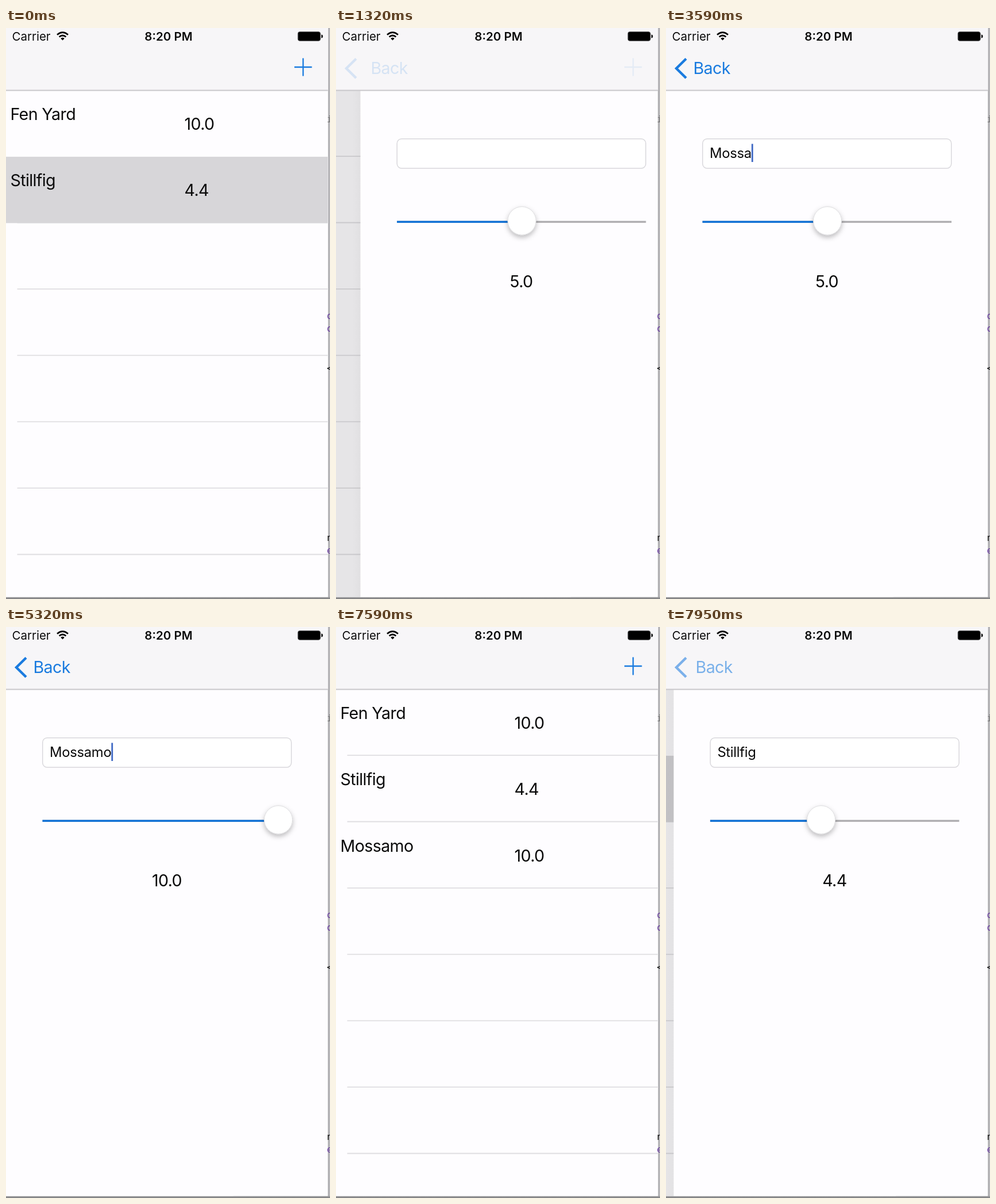
Recreate the animation shown at these times as an HTML page. Size 564 by 993 pixels, loop 8 s.

```html
<!DOCTYPE html>
<html lang="en">
<head>
<meta charset="utf-8">
<title>Rating list</title>
<style>
  html, body { margin: 0; width: 100%; height: 100%; overflow: hidden; background: #fefdff; }
  svg { display: block; width: 100vw; height: 100vh; }
  text { font-family: Inter, Roboto, sans-serif; fill: #0a0a0a; white-space: pre; }
  .body { font-size: 28.6px; letter-spacing: -.022em; }
  .field { font-size: 23.8px; letter-spacing: -.012em; }
  .status { font-size: 20.5px; }
  .blue { fill: #1a7bdf; }
  .edge { font: 16px "DejaVu Sans Mono", monospace; }
</style>
</head>
<body>
<svg viewBox="0 0 564 993" preserveAspectRatio="none">
  <defs>
    <clipPath id="screen"><rect width="560.5" height="989.5"/></clipPath>
    <linearGradient id="side">
      <stop offset="0" stop-color="#9c9b9e"/><stop offset="1" stop-color="#c2c1c4"/>
    </linearGradient>
    <linearGradient id="floor" x2="0" y2="1">
      <stop offset="0" stop-color="#a2a2a4"/><stop offset="1" stop-color="#7c7c7e"/>
    </linearGradient>
    <linearGradient id="cast">
      <stop offset="0" stop-opacity="0"/><stop offset="1" stop-opacity=".3"/>
    </linearGradient>
    <filter id="lift" x="-50%" y="-50%" width="200%" height="200%">
      <feDropShadow dx="0" dy="4" stdDeviation="4" flood-opacity=".26"/>
    </filter>
  </defs>

  <rect width="564" height="993" fill="#fefdff"/>
  <rect x="560" width="4" height="993" fill="url(#side)"/>
  <rect y="989.5" width="564" height="3.5" fill="url(#floor)"/>

  <g clip-path="url(#screen)">
    <g id="list">
      <rect width="564" height="990" fill="#fefdff"/>
      <g id="rows"></g>
    </g>
    <rect id="dim" width="561" height="990"/>
    <g id="detail">
      <rect id="shadow" x="-14" width="14" height="990" fill="url(#cast)"/>
      <rect width="564" height="990" fill="#fefdff"/>
      <rect x="63.7" y="192.7" width="433" height="51.3" rx="8" fill="#fff" stroke="#d9d8dc" stroke-width="1.5"/>
      <text id="title" class="field" x="76" y="226"></text>
      <rect id="caret" y="201.5" width="2.8" height="31.5" fill="#3e68c4"/>
      <path d="M63.5 337.2H497" stroke="#acabae" stroke-width="3.3"/>
      <path id="fill" stroke="#0a6fd8" stroke-width="3.3"/>
      <circle id="thumb" cy="335.3" r="24.6" fill="#fff" stroke="#d9d9db" stroke-width=".9" filter="url(#lift)"/>
      <text id="value" class="body" x="280" y="451" text-anchor="middle"></text>
    </g>

    <rect width="561" height="108" fill="#f7f6f8"/>
    <path d="M0 108.5H561" stroke="#c9c8cb" stroke-width="1.8"/>
    <path id="chevron" d="M35 53.5L18 70.2L35 87" fill="none" stroke="#1a7bdf" stroke-width="4.4"/>
    <text id="back" class="body blue" x="47.5" y="80">Back</text>
    <path id="plus" d="M502 68H532.5M517.2 52.5V83.5" stroke="#1a7bdf" stroke-width="2.3"/>

    <text class="status" x="10.5" y="21.7">Carrier</text>
    <g fill="none" stroke="#0a0a0a" stroke-width="2.7">
      <path d="M89 11.7Q98.5 3.5 108 11.7"/>
      <path d="M92.6 15.5Q98.5 10.5 104.4 15.5"/>
    </g>
    <path d="M95.3 18.2Q98.5 15.5 101.7 18.2L98.5 21.5Z"/>
    <text class="status" x="283" y="21.7" text-anchor="middle" font-weight="600">8:20 PM</text>
    <rect x="508.2" y="6.7" width="39" height="15.6" rx="3" stroke="#4c4c4e"/>
    <path d="M549 11.500q2.500 0 2.500 3t-2.500 3z"/>
  </g>

  <g id="edges"></g>
</svg>

<script>
const $ = id => document.getElementById(id);
const LOOP = 8000, WIDTH = 560, ROW = 115.4, TOP = 107.7;
const PUSH = 1115, POP = 6338, TAP = 7640, REOPEN = 7650, SLIDE = 500;
const NAME = 'Mossamo';
const KEYS = [2650, 2850, 3030, 3230, 3420, 3700, 3880];
const FOCUS = 2100;
const ITEMS = [['Fen Yard', '10.0'], ['Stillfig', '4.4'], [NAME, '10.0']];

function add(parent, tag, attrs, text = '') {
  const el = document.createElementNS('http://www.w3.org/2000/svg', tag);
  for (const key in attrs) el.setAttribute(key, attrs[key]);
  el.textContent = text;
  parent.append(el);
  return el;
}

const lines = [1, 2, 3, 4, 5, 6, 7].map(i => {
  const y = TOP + i * ROW;
  return add($('rows'), 'path', { d: `M19.5 ${y}H564`, stroke: '#dfdee1', 'stroke-width': 1.8 });
});
const highlight = add($('rows'), 'rect', { y: TOP + ROW + .8, width: 564, height: ROW, fill: '#d7d6d9' });
const rows = ITEMS.map(([name, score], i) => {
  const g = add($('rows'), 'g', { transform: `translate(0 ${i * ROW})` });
  add(g, 'text', { class: 'body', x: 7.5, y: 160 }, name);
  add(g, 'text', { class: 'body', x: 310.5, y: 177 }, score);
  return g;
});

// Slivers of the window behind the simulator
[['i', 164, '#777'], ['o', 506, '#6a3fa0'], ['o', 528, '#6a3fa0'],
 ['<', 597, '#111'], ['n', 892, '#111'], ['e', 914, '#6a3fa0']]
  .forEach(([ch, y, fill]) => add($('edges'), 'text', { class: 'edge', x: 558.5, y, style: `fill:${fill}` }, ch));

const clamp = x => Math.min(1, Math.max(0, x));
const ramp = (t, a, b) => clamp((t - a) / (b - a));
const smooth = x => x * x * (3 - 2 * x);

// cubic-bezier(.32, .72, 0, 1)
function ease(x) {
  if (x <= 0 || x >= 1) return clamp(x);
  let lo = 0, hi = 1;
  for (let i = 0; i < 24; i++) {
    const s = (lo + hi) / 2, r = 1 - s;
    if (3 * r * r * s * .32 + s ** 3 < x) lo = s; else hi = s;
  }
  const r = 1 - lo;
  return 3 * r * r * lo * .72 + 3 * r * lo * lo + lo ** 3;
}

function navigation(t) {
  if (t >= POP && t < REOPEN) {
    const dt = t - POP;
    return {
      shown: 1 - ease(dt / SLIDE),
      travel: 144,
      back: 1 - ramp(dt, 0, 110),
      chevron: 1 - ramp(dt, 0, 76),
      plus: ramp(dt, 200, 420)
    };
  }
  const dt = t - (t < POP ? PUSH : REOPEN);
  const back = ramp(dt, 172, 400);
  return { shown: ease(dt / SLIDE), travel: 170, back, chevron: back, plus: 1 - ramp(dt, 0, 224) };
}

function caretOn(t, typed) {
  if (t < FOCUS || t >= POP - 60) return false;
  const since = typed ? KEYS[typed - 1] : FOCUS;
  return (t - since) % 1000 < 520;
}

function draw(t) {
  const nav = navigation(t);
  const x = WIDTH * (1 - nav.shown);
  const reopened = t >= TAP;
  const lit = reopened ? 1 : 1 - ramp(t, PUSH, PUSH + 150);

  $('list').setAttribute('transform', `translate(${-.3 * WIDTH * nav.shown} 0)`);
  $('detail').setAttribute('transform', `translate(${x} 0)`);
  $('dim').setAttribute('opacity', .1 * nav.shown);
  $('shadow').setAttribute('opacity', nav.shown ? x / WIDTH : 0);
  highlight.setAttribute('opacity', lit);
  lines[0].setAttribute('opacity', 1 - lit);
  rows[2].setAttribute('visibility', t >= POP && t < LOOP ? 'visible' : 'hidden');

  $('back').setAttribute('transform', `translate(${nav.travel * (1 - nav.shown)} 0)`);
  for (const id of ['back', 'chevron', 'plus']) $(id).setAttribute('opacity', nav[id]);

  const typed = KEYS.filter(k => t >= k).length;
  $('title').textContent = reopened ? ITEMS[1][0] : NAME.slice(0, typed);
  $('caret').setAttribute('x', 76 + (typed ? $('title').getComputedTextLength() : 0));
  $('caret').setAttribute('visibility', caretOn(t, typed) ? 'visible' : 'hidden');

  const value = reopened ? 4.37 : 5 + 5 * smooth(ramp(t, 4450, 5150));
  const knob = 88 + value * 38.6;
  $('fill').setAttribute('d', `M63.5 337.2H${knob}`);
  $('thumb').setAttribute('cx', knob);
  $('value').textContent = value.toFixed(1);
}

const start = performance.now();
function tick() {
  draw((performance.now() - start) % LOOP);
  requestAnimationFrame(tick);
}
tick();
</script>
</body>
</html>
```
